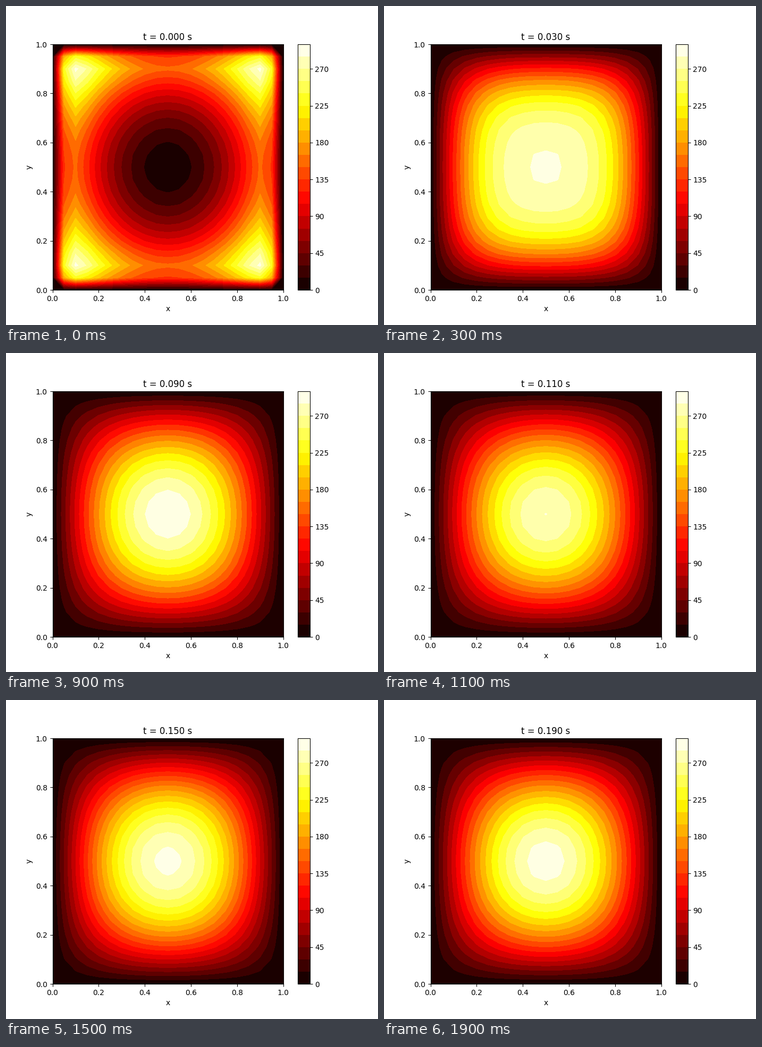
These frames come from a looping animation (700 px wide and 600 px high, 2 s). A matplotlib script:

```python
import numpy as np
import matplotlib.pyplot as plt
from matplotlib.animation import FuncAnimation

# Heat equation on the unit square, edges held at zero
N = 21
H = 1 / (N - 1)
DT = 0.001
STEPS_PER_FRAME = 10
FRAMES = 20

x = np.linspace(0, 1, N)
X, Y = np.meshgrid(x, x)
START = 1000 * ((X - 0.5) ** 2 + (Y - 0.5) ** 2)

# Alternating-direction step: the same operator acts along x and y
m = N - 2
lap = (np.eye(m, k=1) - 2 * np.eye(m) + np.eye(m, k=-1)) / H ** 2
STEP = np.linalg.solve(np.eye(m) - DT / 2 * lap, np.eye(m) + DT / 2 * lap)


def temperature(frame):
    op = np.linalg.matrix_power(STEP, frame * STEPS_PER_FRAME + 1)
    temp = np.zeros((N, N))
    temp[1:-1, 1:-1] = op @ START[1:-1, 1:-1] @ op.T
    return temp


fig, ax = plt.subplots(figsize=(7, 6), dpi=100)


def draw(frame):
    ax.clear()
    filled = ax.contourf(X, Y, temperature(frame), 20, cmap="hot")
    ax.set_title(f"t = {frame * STEPS_PER_FRAME * DT:.3f} s")
    ax.set_xlabel("x")
    ax.set_ylabel("y")
    return filled


# The colour scale is fixed by the first state
fig.colorbar(draw(0), ax=ax)


def update(frame):
    draw(frame)
    return []


anim = FuncAnimation(fig, update, frames=FRAMES, interval=100, repeat=True)
plt.show()
```
